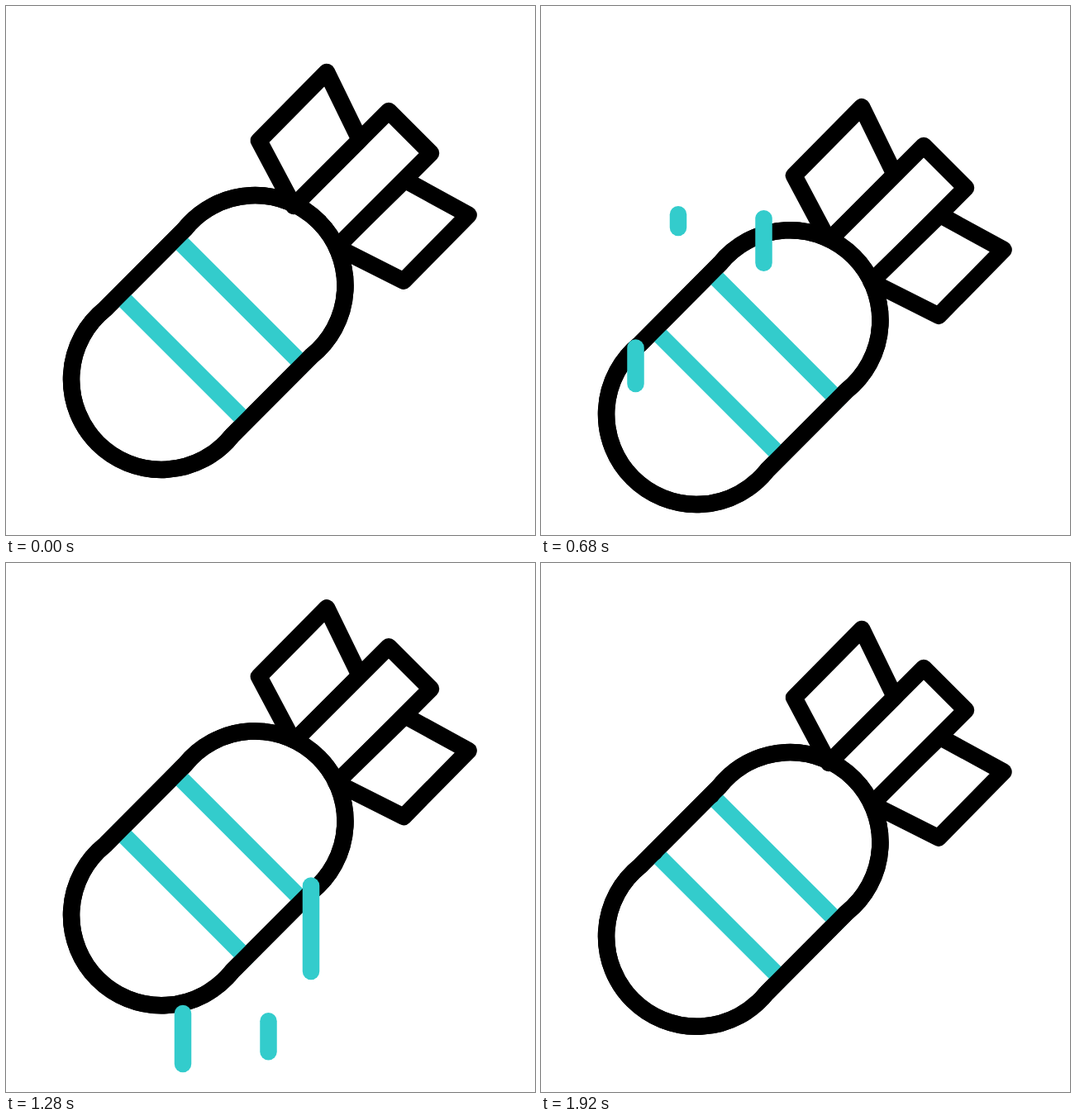
These frames come from a looping animation (640 px wide and 640 px high, 2000 ms). An HTML page:

```html
<!DOCTYPE html>
<html lang="en">
<head>
<meta charset="utf-8">
<title>Falling bomb</title>
<style>
  html, body { margin: 0; width: 100%; height: 100%; overflow: hidden; background: #fff; }
  svg { display: block; width: 100vw; height: 100vh; }
  .ink, .teal { stroke-width: 20.5; stroke-linecap: round; stroke-linejoin: round; }
  .ink { stroke: #000; fill: #fff; }
  .teal { stroke: #3cc; fill: none; }
  .rim { fill: none; }
</style>
</head>
<body>
<svg viewBox="0 0 640 640">
  <defs>
    <path id="shell" d="M120 366.6 L216.2 270 A109.1 109.1 0 1 1 369.5 423.4 L273.3 520 A109.1 109.1 0 1 1 120 366.6 Z"/>
  </defs>
  <g id="bomb">
    <polygon id="backFin" class="ink"/>
    <polygon class="ink" points="350,240 463,127 514,178 401,291"/>
    <use href="#shell" class="ink"/>
    <g id="bands"></g>
    <use href="#shell" class="ink rim"/>
    <polygon id="frontFin" class="ink"/>
  </g>
  <g id="streaks"></g>
</svg>
<script>
const LOOP = 2000, STEP = 40;
const $ = id => document.getElementById(id);

function set(el, attrs) {
  for (const name in attrs) el.setAttribute(name, attrs[name]);
  return el;
}
function addPath(parent, attrs) {
  const el = document.createElementNS('http://www.w3.org/2000/svg', 'path');
  return parent.appendChild(set(el, attrs));
}

const mix = (a, b, k) => a + (b - a) * k;
function ease(t, from, to) {
  const u = Math.min(1, Math.max(0, (t - from) / (to - from)));
  return u * u * (3 - 2 * u);
}

// Keys are [time, values]; every segment eases in and out.
function track(t, keys) {
  let i = 0;
  while (i < keys.length - 2 && t > keys[i + 1][0]) i++;
  const [from, a] = keys[i], [to, b] = keys[i + 1];
  const k = ease(t, from, to);
  return a.map((v, n) => mix(v, b[n], k));
}

const fall = [[103, [0]], [850, [48.5]], [1393, [-35]], [1937, [0]]];

// Fin corners: outer top, outer bottom, root bottom, root top.
const left = [388, 80, 306, 163, 348, 242, 428, 162];
const right = [559.6, 252.7, 481, 332.6, 399.5, 291.5, 482.5, 210.5];
const near = [490.5, 149.5, 410.5, 230, 391, 248, 473, 168];
const far = [433.5, 206.5, 354, 286, 358, 282, 440, 200];
const frontKeys = [[103, left], [335, near], [635, right], [1400, right], [1699, near], [1925, left]];
const backKeys = [[103, right], [394, far], [667, left], [1390, left], [1664, far], [1925, right]];

const BAND = 153.3;
const bands = [[205.75, 280.75], [137, 349.5]].map(([x, y]) => {
  addPath($('bands'), { class: 'teal', d: `M${x} ${y} l${BAND} ${BAND}` });
  return { x, y, el: addPath($('bands'), { class: 'ink' }) };
});

// The rising streaks are the falling ones turned by half a circle, 800 ms later.
const streaks = [];
function addStreak(x, from, to, delay) {
  streaks.push({ x, from, to, delay, el: addPath($('streaks'), { class: 'teal' }) });
}
for (const [x, top, bottom, delay] of [[114.5, 287, 457, 0], [166, 207, 268, 0], [269.5, 199.5, 313, 78]]) {
  addStreak(x, top, bottom, delay);
  addStreak(483.5 - x, 808 - top, 808 - bottom, delay + 800);
}

// A black line sweeps over each band, first downwards, later back up.
function drawBands(t) {
  const back = t > 1000;
  const lead = back ? 1 - ease(t, 1400, 1650) : ease(t, 103, 350);
  const trail = back ? 1 - ease(t, 1513, 1930) : ease(t, 224, 648);
  const shown = Math.abs(lead - trail) > 0.001;
  for (const { x, y, el } of bands) {
    const at = k => `${x + BAND * k} ${y + BAND * k}`;
    set(el, { d: shown ? `M${at(trail)} L${at(lead)}` : '' });
  }
}

function drawStreaks(t) {
  for (const { x, from, to, delay, el } of streaks) {
    const time = t - delay;
    const head = mix(from, to, ease(time, 117, 645));
    const tail = mix(from, to, ease(time, 359, 839));
    set(el, { d: Math.abs(head - tail) > 0.05 ? `M${x} ${tail} V${head}` : '' });
  }
}

function draw(t) {
  set($('bomb'), { transform: `translate(0 ${track(t, fall)[0]})` });
  set($('frontFin'), { points: track(t, frontKeys).join(' ') });
  set($('backFin'), { points: track(t, backKeys).join(' ') });
  drawBands(t);
  drawStreaks(t);
}

function tick() {
  const t = performance.now() % LOOP;
  draw(Math.floor(t / STEP) * STEP);
  requestAnimationFrame(tick);
}
tick();
</script>
</body>
</html>
```
